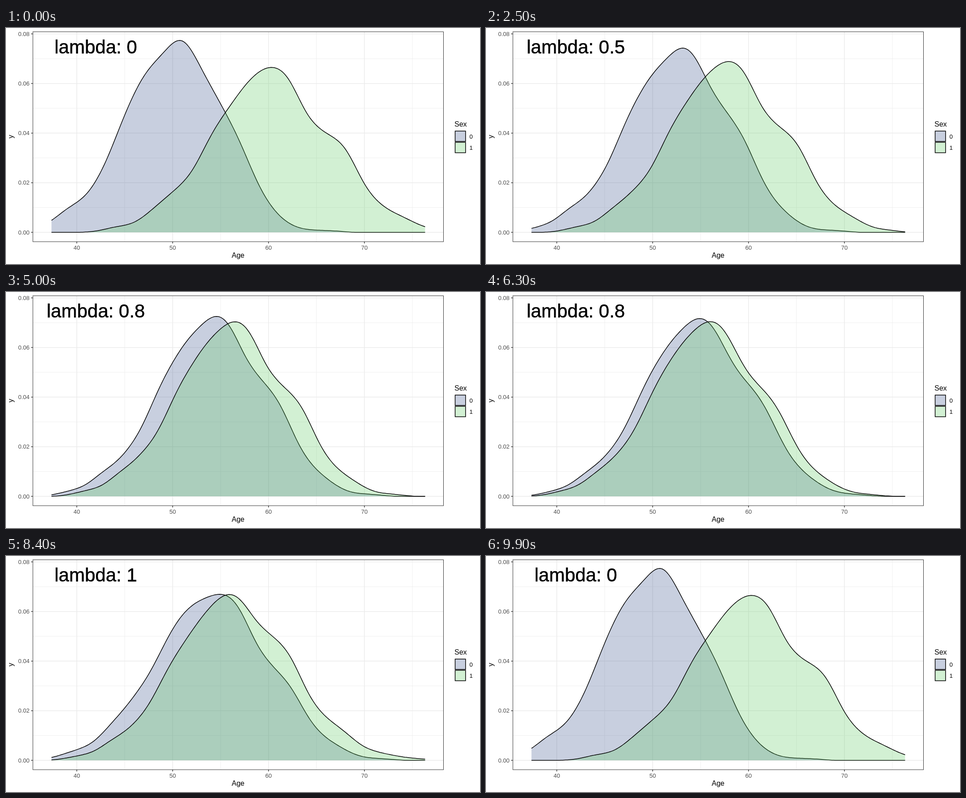
An HTML page that plays this animation: 1058x529 px, repeating every 10000 ms.

```html
<!DOCTYPE html>
<html lang="en">
<head>
<meta charset="utf-8">
<title>Age density by lambda</title>
<style>
  html, body { margin: 0; width: 100%; height: 100%; overflow: hidden; background: #fff; }
  svg { display: block; width: 100vw; height: 100vh; font-family: "Liberation Sans", Arial, sans-serif; }
  .tick { font-size: 13px; fill: #4d4d4d; }
  .key { font-size: 13px; }
  .title { font-size: 16px; }
  .label { font-size: 42px; stroke: #000; stroke-width: .5; }
  .grid line { stroke: #ebebeb; }
  .axis line { stroke: #333; stroke-width: 1.4; }
  .zero { fill: #3b528b; fill-opacity: .28; }
  .one { fill: #5dc863; fill-opacity: .28; }
  .edge { fill: none; stroke: #000; stroke-width: 1.5; stroke-linejoin: round; }
  .swatch { stroke: #000; stroke-width: 1.5; }
</style>
</head>
<body>
<svg viewBox="0 0 1058 529">
  <g class="grid" id="grid"></g>
  <path class="zero" id="fill0"/><path class="edge" id="edge0"/>
  <path class="one" id="fill1"/><path class="edge" id="edge1"/>
  <text class="label" id="label" x="200.5" y="56.5" text-anchor="middle">lambda: 0</text>
  <rect x="60" y="8.5" width="916.5" height="470.5" fill="none" stroke="#333" stroke-width="1"/>
  <g class="axis" id="axis"></g>
  <text class="title" x="518" y="514.5" text-anchor="middle">Age</text>
  <text class="title" transform="translate(16 243.5) rotate(-90)" text-anchor="middle">y</text>
  <text class="title" x="1001" y="221">Sex</text>
  <rect class="zero swatch" x="1002.5" y="231" width="23.3" height="23.3"/>
  <rect class="one swatch" x="1002.5" y="256.3" width="23.3" height="23.3"/>
  <text class="key" x="1034.5" y="247.5">0</text>
  <text class="key" x="1034.5" y="273">1</text>
</svg>
<script>
const $ = id => document.getElementById(id);
const BASE = 458, UNIT = 5560;
const px = age => 158 + (age - 40) * 21.4;
const py = density => BASE - density * UNIT;

// Fine age grid for the maths, and the shown age range.
const LOW = 32, DX = .05, CELLS = 1000, FLOOR = .01;
const grid = Array.from({ length: CELLS + 1 }, (_, i) => LOW + i * DX);
const MIN = 37.36, MAX = 76.33, SAMPLES = 240;
const ages = Array.from({ length: SAMPLES + 1 }, (_, n) => MIN + (MAX - MIN) * n / SAMPLES);

// Smooth curve through heights set two years apart, zero outside them.
function spline(first, heights) {
  const y = [0, 0, ...heights, 0, 0], m = y.map(() => 0);
  for (let pass = 0; pass < 40; pass++)
    for (let i = 1; i < y.length - 1; i++)
      m[i] = (6 * (y[i - 1] - 2 * y[i] + y[i + 1]) - m[i - 1] - m[i + 1]) / 4;
  return age => {
    const u = (age - first) / 2 + 2, i = Math.floor(u), b = u - i, a = 1 - b;
    if (i < 0 || i >= y.length - 1) return 0;
    return a * y[i] + b * y[i + 1] + ((a ** 3 - a) * m[i] + (b ** 3 - b) * m[i + 1]) / 6;
  };
}

// Linear lookup of x in rising xs.
function interp(xs, ys, x) {
  let lo = 0, hi = xs.length - 1;
  if (x <= xs[lo]) return ys[lo];
  if (x >= xs[hi]) return ys[hi];
  while (hi - lo > 1) {
    const mid = (lo + hi) >> 1;
    if (xs[mid] <= x) lo = mid; else hi = mid;
  }
  return ys[lo] + (ys[hi] - ys[lo]) * (x - xs[lo]) / (xs[hi] - xs[lo]);
}

function distribution(curve) {
  const h = grid.map(age => Math.max(FLOOR, curve(age)));
  const cdf = [0];
  for (let i = 1; i <= CELLS; i++) cdf.push(cdf[i - 1] + (h[i] + h[i - 1]) / 2);
  return { h, cdf: cdf.map(c => c / cdf[CELLS]) };
}

const groups = [
  distribution(spline(35, [7, 22, 53, 86, 158, 263, 350, 402, 429, 367, 288, 203, 106, 41, 12, 5, 3])),
  distribution(spline(42, [3, 12, 23, 54, 91, 138, 217, 284, 340, 369, 346, 267, 223, 187, 109, 59, 35, 15, 4]))
];

// Move each quantile of one group toward the other; lambda 1 meets halfway.
function repair(own, other, lambda) {
  const t = lambda / 2;
  const xs = [], hs = [];
  grid.forEach((age, i) => {
    const match = interp(other.cdf, grid, own.cdf[i]);
    xs.push((1 - t) * age + t * match);
    hs.push(1 / ((1 - t) / own.h[i] + t / interp(grid, other.h, match)));
  });
  return ages.map(age => interp(xs, hs, age));
}

const states = [0, .5, .8, 1].map(lambda => ({
  lambda,
  shapes: groups.map((g, i) => repair(g, groups[1 - i], lambda))
}));

function add(parent, tag, attrs, text) {
  const el = document.createElementNS("http://www.w3.org/2000/svg", tag);
  for (const k in attrs) el.setAttribute(k, attrs[k]);
  if (text) el.textContent = text;
  $(parent).append(el);
}
const line = (parent, x1, y1, x2, y2, width) =>
  add(parent, "line", { x1, y1, x2, y2, "stroke-width": width });
const vertical = (age, width) => line("grid", px(age), 9, px(age), 479, width);
const horizontal = (d, width) => line("grid", 60, py(d), 976, py(d), width);

for (let age = 45; age < 80; age += 10) vertical(age, .8);
for (let d = .01; d < .08; d += .02) horizontal(d, .8);
for (let age = 40; age < 80; age += 10) {
  vertical(age, 1.5);
  line("axis", px(age), 479, px(age), 483);
  add("axis", "text", { class: "tick", x: px(age), y: 496.5, "text-anchor": "middle" }, String(age));
}
for (let i = 0; i < 5; i++) {
  const d = i * .02;
  horizontal(d, 1.5);
  line("axis", 56, py(d), 60, py(d));
  add("axis", "text", { class: "tick", x: 52.5, y: py(d) + 4.5, "text-anchor": "end" }, d.toFixed(2));
}

// First and last tick of each move to the next state, ten ticks a second.
const moves = [[5, 25], [31, 50], [55, 74], [80, 99]];

function draw(tick) {
  let k = 0;
  while (k < 3 && tick >= moves[k + 1][0]) k++;
  const [from, to] = moves[k];
  const w = Math.min(1, Math.max(0, (tick - from) / (to - from)));
  const a = states[k], b = states[(k + 1) % 4];
  $("label").textContent = "lambda: " + (w > .5 ? b : a).lambda;
  for (let g = 0; g < 2; g++) {
    const points = a.shapes[g].map((h, n) =>
      px(ages[n]).toFixed(2) + " " + (BASE - h - (b.shapes[g][n] - h) * w).toFixed(2));
    const d = "M" + points.join("L");
    $("edge" + g).setAttribute("d", d);
    $("fill" + g).setAttribute("d", `${d}L${px(MAX)} ${BASE}L${px(MIN)} ${BASE}Z`);
  }
}

let start = null, shown = -1;
function loop(now) {
  if (start === null) start = now;
  const tick = Math.floor((now - start) / 100) % 100;
  if (tick !== shown) draw(shown = tick);
  requestAnimationFrame(loop);
}
draw(0);
requestAnimationFrame(loop);
</script>
</body>
</html>
```
